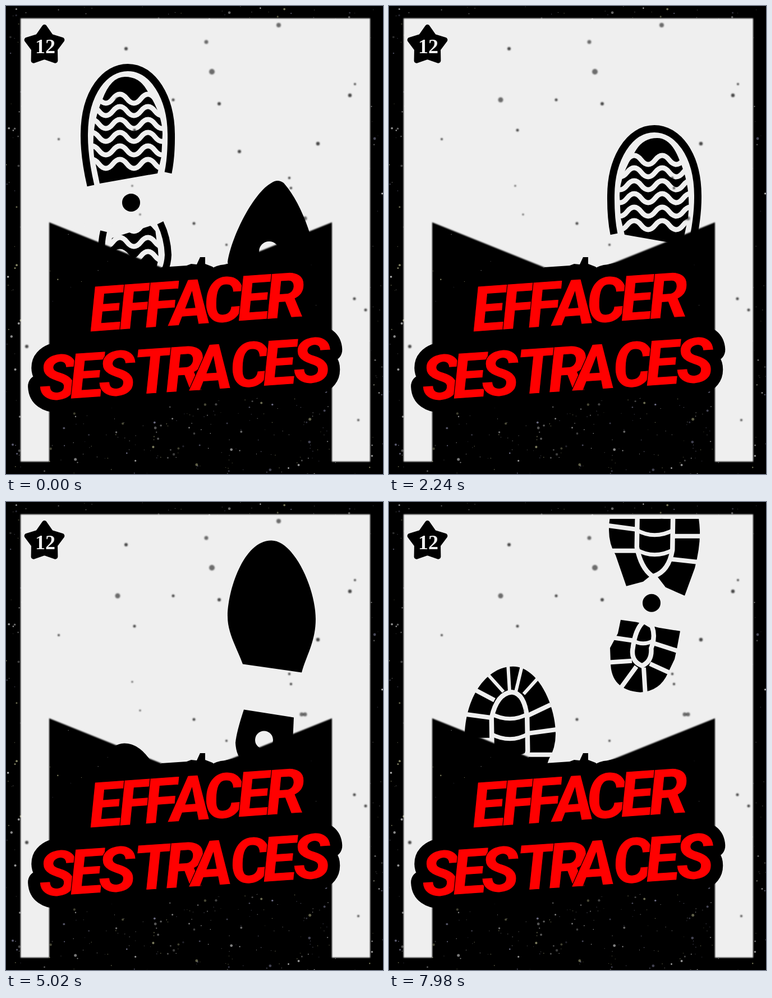
Animation of 672 by 833 pixels, one loop 8000 ms. Source, as an HTML page:

```html
<!DOCTYPE html>
<html lang="fr">
<head>
<meta charset="utf-8">
<title>Effacer ses traces</title>
<style>
  html, body { margin: 0; width: 100%; height: 100%; overflow: hidden; background: #000; }
  svg { display: block; width: 672px; height: 833px; }
  .paper { fill: #efefef; }
  .cut { fill: none; stroke: #efefef; }
  .line { fill: none; stroke: #000; }
  .soft { filter: blur(.8px); }
  .title { font: italic 900 113px Roboto, sans-serif; }
  .title .back { stroke: #000; stroke-width: 42; stroke-linejoin: round; }
  .title .front { fill: #f00; stroke: #000; stroke-width: 1.2; }
  .number { font: 700 36px "Liberation Serif", serif; fill: #efefef; text-anchor: middle; }
</style>
</head>
<body>
<svg viewBox="0 0 672 833">
  <defs>
    <clipPath id="window"><rect y="30" width="672" height="803"/></clipPath>
    <clipPath id="pocketClip"><path d="M77 385L329 486L581 385V833H77Z"/></clipPath>

    <g id="pointed">
      <path d="M78 145C70 95 30 20 0 4Q-11 -4 -22 4C-45 30 -62 70 -72 105L-80 150L-60 240L50 240Z"/>
      <circle class="paper" cx="4" cy="126" r="18"/>
    </g>

    <g id="wavy">
      <path d="M-50 213L-60 165Q-66 110 -45 63Q-30 23 -5 23Q20 23 33 45Q62 90 62 125L60 165L53 195Z"/>
      <path d="M-28 310L48 286L52 320Q58 345 50 365Q38 389 15 389Q-15 389 -28 360Q-34 340 -28 310Z"/>
      <g id="waves" class="cut" stroke-width="9"></g>
      <g class="line" stroke-width="13">
        <path d="M-66 217Q-78 165 -77.5 125C-77 50 -40 6.5 0 6.5C45 6.5 77 60 77.5 125Q78 165 72 194"/>
        <path d="M58 283Q71 310 72 340C70 385 38 403 14 403C-20 403 -47 375 -47 335Q-47 315 -43 298" stroke-width="12"/>
      </g>
      <circle cx="6" cy="247" r="16"/>
    </g>

    <g id="flat">
      <path d="M51 220C62 190 78 165 78 135C78 90 50 0 0 0C-40 0 -79 85 -79 140C-79 180 -62 205 -54 235Z"/>
      <path d="M49 301L-40 315L-38 360Q-30 411 5 411Q62 408 64 360Q62 340 49 301Z"/>
      <circle class="paper" cx="13" cy="355" r="16"/>
    </g>

    <g id="lug">
      <path d="M-54 237L-72 188Q-82 150 -81 120C-78 50 -40 0 5 0C50 0 81 70 81 120Q81 145 69 165L50 220L20 212L0 196L-20 222Z"/>
      <path d="M-46 300L-8 294L32 284L60 280L65 304L79 330L78 355Q78 405 25 409Q-10 407 -24 375L-36 350L-40 332Z"/>
      <g class="cut" stroke-width="8">
        <path d="M-85 178L-30 172M-85 131H-30M-80 85L-28 92M-62 42L-28 60M72 68L30 88M84 112L32 119M84 157H30"/>
        <path d="M-40 14L-12 45M-4 -5L-1 45M22 -5L10 45M52 18L24 49" stroke-width="6"/>
        <path d="M-50 338L0 322M30 318L85 310M-40 380L8 358M40 353L85 356M19 365L16 414M32 363L62 404"/>
        <path d="M3 50Q22 52 26 92L27 150Q20 185 2 198Q-22 190 -28 155L-29 92Q-20 52 3 50ZM18 288Q30 300 34 330Q38 350 22 357Q8 350 10 330Q2 310 8 294Z"
              style="fill:#000;stroke-width:17;paint-order:stroke"/>
        <path d="M-34 84Q0 102 32 84M-34 120Q0 138 32 120M-34 155Q0 173 32 155M2 317Q20 327 38 317" stroke-width="7"/>
      </g>
      <circle cx="5" cy="250" r="16"/>
    </g>
  </defs>

  <rect width="672" height="833"/>
  <g id="borderDust"></g>
  <rect class="paper soft" x="26" y="22" width="623" height="789"/>
  <g id="prints" clip-path="url(#window)"></g>
  <g id="specks" class="soft"></g>
  <path class="soft" d="M77 385L329 486L581 385V833H77Z"/>
  <g id="pocketDust" clip-path="url(#pocketClip)"></g>
  <path d="M270 490L277 465L322 462L330 459L340 460L346 447H355V459L368 464L374 470L390 460L412 455V500Z"/>
  <g id="title" class="title"></g>
  <path id="star" stroke="#000" stroke-width="9" stroke-linejoin="round"/>
  <text class="number" x="70" y="84">12</text>
</svg>

<script>
const byId = id => document.getElementById(id);

function add(parent, tag, attrs, text = '') {
  const el = document.createElementNS(parent.namespaceURI, tag);
  for (const key in attrs) el.setAttribute(key, attrs[key]);
  el.textContent = text;
  return parent.appendChild(el);
}

function randomFrom(seed) {
  return () => (seed = (seed * 16807) % 2147483647) / 2147483647;
}

function scatter(parent, count, top, seed) {
  const random = randomFrom(seed);
  const tints = ['#fff', '#ddd', '#cc9', '#99b'];
  for (let i = 0; i < count; i++) {
    add(parent, 'circle', {
      cx: (random() * 672).toFixed(1),
      cy: (top + random() * (833 - top)).toFixed(1),
      r: (.6 + random() ** 3 * 1.9).toFixed(1),
      fill: tints[Math.floor(random() * 4)],
      opacity: (.2 + random() * .5).toFixed(2)
    });
  }
}
scatter(byId('borderDust'), 900, 0, 71);
scatter(byId('pocketDust'), 130, 385, 913);
scatter(byId('pocketDust'), 210, 690, 4021);

// x, y, radius
const specks = [
  [486, 34, 4], [357, 64, 3.5], [214, 76, 3], [367, 117, 5], [199, 167, 4.5],
  [298, 167, 2.5], [380, 174, 3], [229, 221, 2.5], [94, 237, 2], [613, 159, 3.2],
  [622, 139, 2], [556, 245, 3.2], [416, 259, 3], [505, 306, 2.2], [508, 324, 2.2],
  [335, 387, 2.5], [527, 378, 3.5], [533, 378, 3.5], [393, 425, 2], [621, 521, 2.5],
  [641, 541, 2.5], [37, 606, 3], [628, 737, 2], [239, 371, 1.6], [225, 320, 1.6]
];
for (const [cx, cy, r] of specks) {
  add(byId('specks'), 'circle', { cx, cy, r, opacity: r > 3.3 ? .55 : .7 });
}

for (const y of [62, 84, 107, 130, 154, 178, 290, 317, 342]) {
  add(byId('waves'), 'path', { d: `M-76.5 ${y}q12.5 -16 25 0` + 't25 0'.repeat(5) });
}

const starPoints = Array.from({ length: 10 }, (_, i) => {
  const radius = i % 2 ? 20 : 33, angle = i * Math.PI / 5;
  return [68.5 + radius * Math.sin(angle), 70.5 - radius * Math.cos(angle)];
});
byId('star').setAttribute('d', `M${starPoints.join('L')}Z`);

const titleLines = [
  { text: 'EFFACER', place: 'translate(150 580) rotate(-4.1)', xs: [0, 53, 99, 144, 205, 265, 316] },
  { text: 'SESTRACES', place: 'translate(60 703) rotate(-3.8)', xs: [0, 55, 106, 171, 226, 272, 342, 400, 454] }
];
for (const layer of ['back', 'front']) {
  for (const { text, place, xs } of titleLines) {
    const line = add(byId('title'), 'g', { class: layer, transform: place });
    [...text].forEach((letter, i) => add(line, 'text', { x: xs[i] }, letter));
  }
}

// start: y before any scrolling; shown: tick at which the print is stamped
const LEFT = 217, RIGHT = 473;
const prints = [
  { shape: 'pointed', x: RIGHT, start: 109, shown: 0 },
  { shape: 'wavy', x: LEFT, start: -99, shown: 0 },
  { shape: 'wavy', x: RIGHT, start: -460, shown: 14 },
  { shape: 'flat', x: LEFT - 6, start: -756, shown: 50 },
  { shape: 'flat', x: RIGHT, start: -1117, shown: 86 },
  { shape: 'lug', x: LEFT - 1, start: -1434, shown: 122 },
  { shape: 'lug', x: RIGHT, start: -1797, shown: 158 }
];
for (const print of prints) print.el = add(byId('prints'), 'use', { href: '#' + print.shape });

const LOOP = 8000, FIRST_STEP = -13, STEP_EVERY = 36, STEP_TICKS = 24;
const strides = [359, 313, 347, 333, 350, 335];

// Three ticks every 140 ms, held for 20, 100 and 20 ms.
function tickAt(ms) {
  const rest = ms % 140;
  return 3 * Math.floor(ms / 140) + (rest >= 120 ? 2 : rest >= 20 ? 1 : 0);
}

function scrollAt(tick) {
  return strides.reduce((sum, stride, i) => {
    const p = Math.min(1, Math.max(0, (tick - FIRST_STEP - i * STEP_EVERY) / STEP_TICKS));
    return sum + stride * p * p * (3 - 2 * p);
  }, 0);
}

function draw(ms) {
  const tick = tickAt(ms % LOOP), scroll = scrollAt(tick);
  for (const { el, x, start, shown } of prints) {
    const y = start + scroll;
    el.setAttribute('visibility', tick >= shown && y < 500 ? 'visible' : 'hidden');
    el.setAttribute('transform', `translate(${x} ${y.toFixed(1)}) scale(${x === RIGHT ? -1 : 1} 1)`);
  }
}

const begin = performance.now();
function loop() {
  draw(performance.now() - begin);
  requestAnimationFrame(loop);
}
loop();
</script>
</body>
</html>
```
